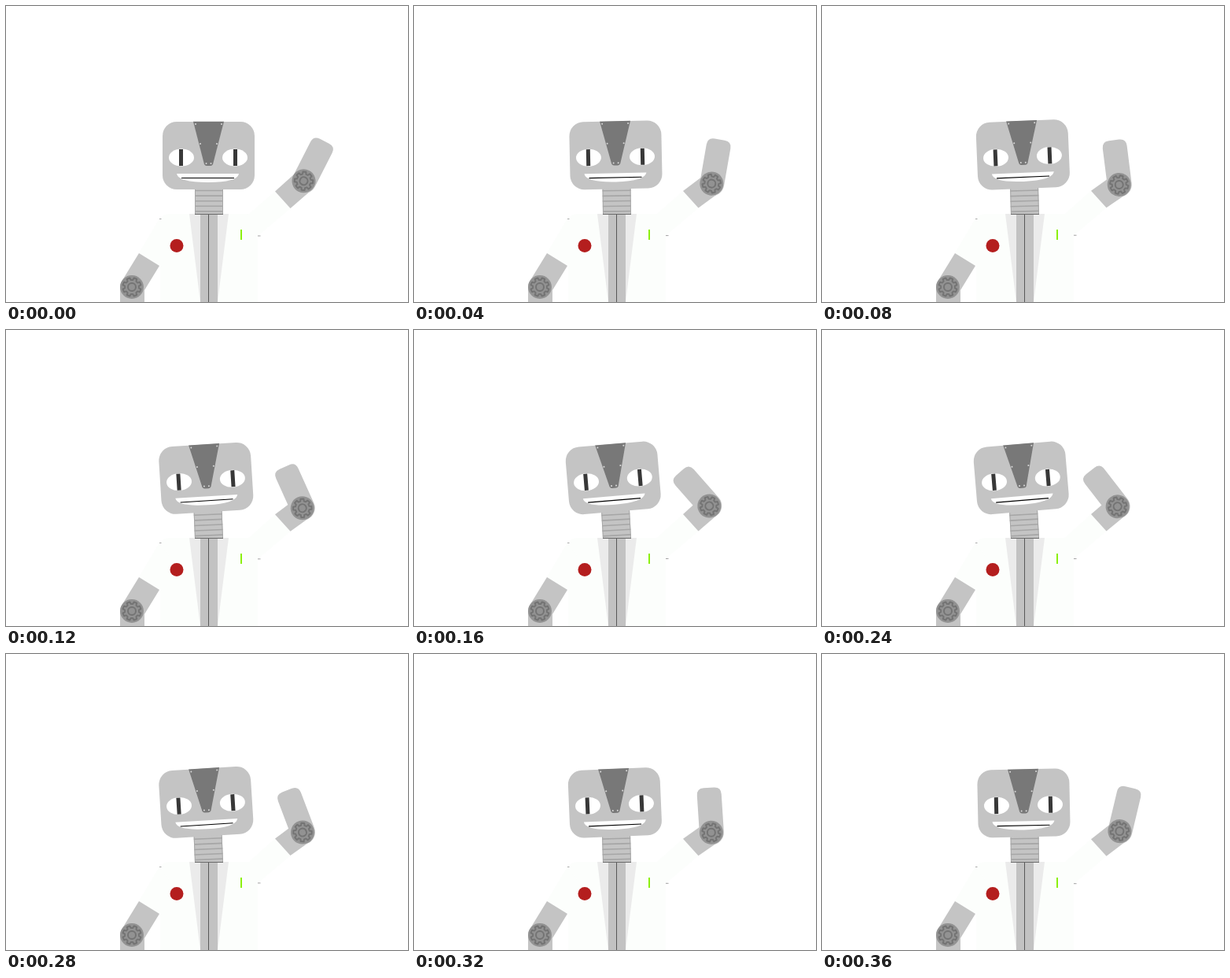
An HTML page for the animation above (400 ms loop, 511 px wide and 376 px high).

```html
<!DOCTYPE html>
<html lang="en">
<head>
<meta charset="utf-8">
<title>Waving robot</title>
<style>
html, body { margin: 0; width: 100%; height: 100%; overflow: hidden; background: #fff; }
svg { display: block; width: 511px; height: 376px; }
.metal { fill: #c4c4c4; }
.coat { fill: #fcfefc; }
.rivet { fill: #d8d8d8; }
.gear { fill: none; stroke: #747474; stroke-width: 2; stroke-linejoin: round; }
</style>
</head>
<body>
<svg viewBox="0 0 511 376">
  <defs>
    <g id="gear">
      <circle r="15" fill="#929292"/>
      <path id="teeth" class="gear"/>
      <circle class="gear" r="5"/>
    </g>
  </defs>

  <g id="neck">
    <rect class="metal" x="240" y="222" width="36" height="50"/>
    <path id="rings" stroke="#a6a6a6" stroke-width="1.6"/>
    <path d="M240.5 222v50M275.5 222v50" stroke="#a8a8a8"/>
  </g>

  <path class="coat" d="M196 270Q200 264 208 264H306Q316 264 320 270V376H196Z"/>
  <path class="coat" d="M195 270L169 314L195 330L215 298Z"/>
  <path d="M233 264H283L269 376H247Z" fill="#ebebeb"/>
  <rect x="247" y="264" width="22" height="112" fill="#c2c2c2"/>
  <path d="M257.5 264V376" stroke="#585858"/>
  <path d="M240 264.5H276" stroke="#686868"/>
  <path d="M195 270.5h2.5" stroke="#a8a8a8"/>
  <circle cx="217" cy="304.5" r="8.5" fill="#b41e1e"/>
  <rect x="298" y="284" width="2" height="13" fill="#8cf00c"/>

  <path class="metal" d="M169 314L195 330L176 361V376H145V357Q145 352 147.5 349Z"/>
  <use href="#gear" x="160" y="357"/>

  <g id="head">
    <rect class="metal" x="199" y="147" width="117" height="86" rx="18"/>
    <path d="M238 146.8H277L263 201Q262 203 260 203H255Q253 203 252 201Z" fill="#787878"/>
    <g class="rivet">
      <circle cx="241" cy="150" r="1"/><circle cx="274" cy="150" r="1"/>
      <circle cx="247" cy="175" r="1"/><circle cx="268" cy="175" r="1"/>
      <circle cx="254.5" cy="200" r="1"/><circle cx="260.5" cy="200" r="1"/>
    </g>
    <ellipse cx="223" cy="192.5" rx="16" ry="11" fill="#fff"/>
    <ellipse cx="291" cy="192.5" rx="16" ry="11" fill="#fff"/>
    <path d="M222.5 182V203M291.500 182V203" stroke="#383838" stroke-width="5"/>
    <path d="M217 213H296Q294 224 257 224Q219 224 217 213Z" fill="#fff"/>
    <path d="M223 218.5H290" stroke="#000" stroke-width="1.2"/>
  </g>

  <path class="coat" id="sleeve"/>
  <path class="metal" id="upper"/>
  <path id="fold" d="M320 292h3.5" stroke="#a0a0a0"/>
  <g id="fore">
    <path class="metal" d="M-15 0V-48Q-15 -57 -6 -57H7Q16 -57 16 -48V0A15.5 15.5 0 0 1 -15 0Z"/>
    <use href="#gear"/>
  </g>
</svg>
<script>
const $ = id => document.getElementById(id);
const set = (id, name, value) => $(id).setAttribute(name, value);
const STEP = 40, STEPS = 10, HALF = STEPS / 2;
const RAISED = 27, BENT = -55, SWING = 17.1;

function gearPath(n) {
  let d = "";
  for (let i = 0; i < n; i++)
    for (const side of [-1, 1])
      for (const root of side < 0 ? [1, 0] : [0, 1]) {
        const a = (i + 0.5 + side * (root ? 0.32 : 0.21)) / n * 2 * Math.PI;
        const r = root ? 9 : 11.8;
        d += `${d ? "L" : "M"}${(r * Math.sin(a)).toFixed(2)} ${(-r * Math.cos(a)).toFixed(2)}`;
      }
  return d + "Z";
}

function pose(k) {
  // head tips over and back evenly
  const tilt = -1.2 * (HALF - Math.abs(k - HALF));
  set("head", "transform", `rotate(${tilt} 230 240)`);
  set("neck", "transform", `rotate(${tilt * 0.67} 258 264)`);

  // forearm swings at a constant rate; the elbow follows an arc
  const angle = k < HALF ? RAISED - SWING * k : BENT + SWING * (k - HALF);
  const bend = (RAISED - angle) / (RAISED - BENT);
  const x = 378.5 - 4.5 * bend ** 2;
  const y = 222.3 - 2.3 * bend + 23 * bend * (1 - bend);
  const lift = 1.8 * bend;
  const top = `342 ${235.5 - lift}`, low = `361.5 ${257 - lift}`;
  set("fore", "transform", `translate(${x} ${y}) rotate(${angle})`);
  set("fold", "transform", `translate(0 ${-lift})`);
  set("sleeve", "d", `M300 272L${top}L${low}L320 ${292 - lift}Z`);
  set("upper", "d", `M${top}L${low}L${x + 10.5} ${y + 11}L${x - 9.8} ${y - 10.7}Z`);
}

let rings = "";
for (let i = 0; i < 5; i++) rings += `M240 ${234.5 + 6.6 * i}h36`;
set("rings", "d", rings);
set("teeth", "d", gearPath(8));

const start = performance.now();
let last = 0;
pose(0);
function tick(now) {
  const k = Math.floor(Math.max(0, now - start) / STEP) % STEPS;
  if (k !== last) pose(last = k);
  requestAnimationFrame(tick);
}
requestAnimationFrame(tick);
</script>
</body>
</html>
```
